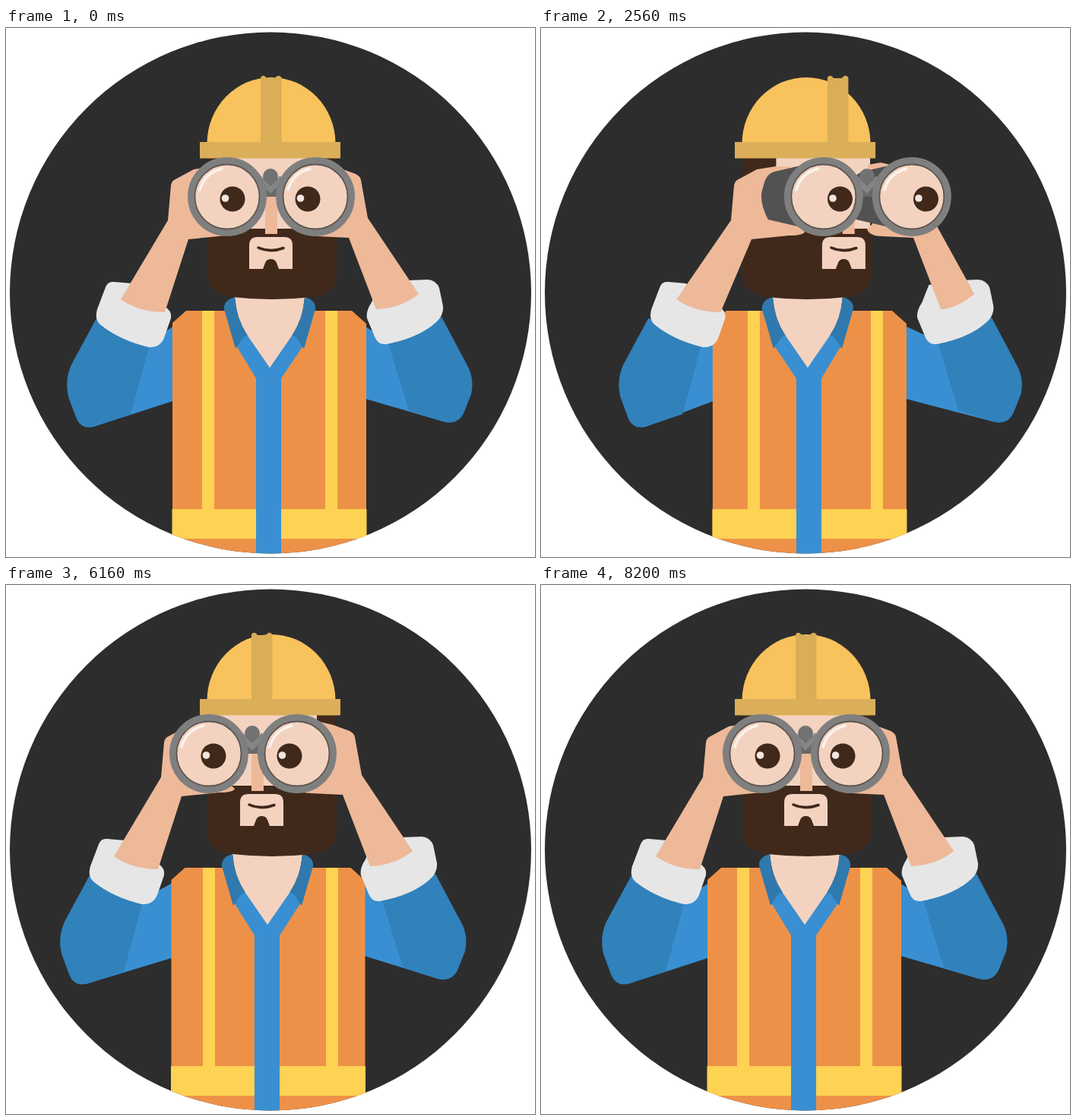
An HTML page that plays this animation: 696 px wide and 696 px high, repeating every 9.4 s.

```html
<!DOCTYPE html>
<html lang="en">
<head>
<meta charset="utf-8">
<title>Lookout</title>
<style>
html, body { margin: 0; width: 100%; height: 100%; overflow: hidden; background: #fff; }
svg { display: block; width: 100vw; height: 100vh; }
.skin { fill: #f3d3c0; }
.hand { fill: #edb999; }
.hair { fill: #40291b; }
.shirt { fill: #398fd1; }
.sleeve { fill: #3181bb; }
.collar { fill: #3079ae; }
.vest { fill: #ee9148; }
.tape { fill: #fed252; }
.cuff { fill: #e6e6e6; }
.barrel { fill: #525252; }
</style>
</head>
<body>
<svg viewBox="0 0 696 696">
  <defs>
    <clipPath id="disc"><circle cx="348" cy="348.5" r="343"/></clipPath>
    <clipPath id="skull"><rect x="267" y="160" width="166" height="110"/></clipPath>
    <g id="lens">
      <circle r="47.5" fill="#f3d3c0" stroke="#7f7f7f" stroke-width="9"/>
      <circle r="42.500" fill="none" stroke="#5c5450" stroke-width="1.8"/>
      <path d="M-36 -9Q-30 -31 -7 -37" fill="none" stroke="#fff" stroke-opacity=".7" stroke-width="3.5" stroke-linecap="round"/>
    </g>
    <g id="pupil">
      <circle r="16.5" class="hair"/>
      <circle cx="-9.5" cy="-1" r="4.8" fill="#f1e6e0"/>
    </g>
    <path id="lapel" class="collar" d="M301 354Q286 358 287 370L302 422L313 406L318 405Q303 382 301 354Z"/>
  </defs>
  <g clip-path="url(#disc)">
    <rect width="696" height="696" fill="#2d2d2d"/>
    <path id="upperL" class="shirt"/>
    <path id="upperR" class="shirt"/>
    <g id="vest">
      <path class="vest" d="M219 700V388L237 372H455L474 389V700Z"/>
      <rect class="tape" x="218.500" y="633" width="256" height="39"/>
    </g>
    <g id="tapes" class="tape">
      <rect x="258" y="372" width="16" height="262"/>
      <rect x="420" y="372" width="16" height="262"/>
    </g>
    <path id="shirt" class="shirt"/>
    <g id="neck">
      <path class="skin" d="M301 345V354Q303 382 318 405L347 447L376 405Q391 382 393 354V345Z"/>
      <use href="#lapel"/>
      <use href="#lapel" transform="translate(694)scale(-1 1)"/>
    </g>
    <rect class="hair" x="267" y="160" width="166" height="120"/>
    <g clip-path="url(#skull)"><rect id="face" class="skin" x="280" y="160" width="136" height="110"/></g>
    <path class="hair" d="M265 264H435V328Q433 349 402 354Q350 360 298 354Q267 349 265 328Z"/>
    <rect id="nose" class="hand" x="341" y="200" width="16" height="71"/>
    <g id="mouth">
      <path class="skin" d="M320 317V286Q320 275 331 275H366Q377 275 377 286V317H359L356 309Q354 304 348.500 304Q343 304 341 309L338 317Z"/>
      <path d="M332 289Q348 296 365 289.500" fill="none" stroke="#40291b" stroke-width="3.5" stroke-linecap="round"/>
    </g>
    <path d="M264.500 152A84.500 87 0 0 1 433.500 152Z" fill="#f8c25c"/>
    <path id="ridge" fill="#d9ae57" d="M335 152V65Q339 60 343 66H354Q358 60 362.500 65V152Z"/>
    <rect x="255" y="150" width="185" height="21.500" fill="#dbae5a"/>
    <path id="armL" class="sleeve" d="M119 382L86 443Q77 463 82 485L92 512Q98 528 114 525L164 508L192 405Z"/>
    <path id="armR" class="sleeve" d="M573 380L609 448Q616 464 612 482L602 507Q594 523 576 518L530 503L500 405Z"/>
    <path id="cuffL" class="cuff" d="M142 334Q134 333 131 341L120 370Q116 384 125 391Q150 411 188 420Q204 421 209 405L217 382Q219 372 208 366L165 336Z"/>
    <path id="cuffR" class="cuff" d="M530 332L555 331Q566 332 570 342L575 366Q576 378 566 387Q543 408 500 416Q489 417 485 406L475 382Q473 373 481 361L490 338Z"/>
    <path id="handL" class="hand"/>
    <path id="handR" class="hand"/>
    <path id="barrelL" class="barrel"/>
    <path id="barrelR" class="barrel"/>
    <g id="bridge">
      <path d="M-15 222L-9 203H9L15 222Z" fill="#696969"/>
      <path d="M-15 197L0 213L15 197" fill="none" stroke="#858585" stroke-width="7"/>
      <circle cy="195" r="10" fill="#727272"/>
    </g>
    <use id="lensL" href="#lens"/>
    <use id="lensR" href="#lens"/>
    <use id="pupilL" href="#pupil"/>
    <use id="pupilR" href="#pupil"/>
  </g>
</svg>
<script>
const LOOP = 9400, CYCLE = 5000;
const FAR_LEFT = -58, FAR_RIGHT = 83;
const el = {};
document.querySelectorAll('svg [id]').forEach(n => el[n.id] = n);

// Part offsets for each turn of the binoculars listed in TURNS.
const TURNS = [FAR_LEFT, -24, 0, 40, FAR_RIGHT];
const POSE = {
  vest: [-3, -1.5, 0, 4.5, 7],
  tapes: [2, 1, 0, 12, 14],
  placket: [-4, -2, 0, 5, 7],
  neck: [-6, -3, 0, 1, 4],
  face: [-16, -7, 0, 17, 30],
  nose: [-37, -18, 0, 30, 57],
  mouth: [-27.5, -12, 0, 28, 51],
  ridge: [-36.5, -12, 0, 21, 43],
  armL: [-26, -9, 0, 8, 23],
  armR: [-24, -8, 0, 7, 20],
  cuffL: [-26, -9, 0, 12, 26],
  cuffR: [-23, -8, 0, 8, 21],
  handL: [-27, -9, 0, 18, 38],
  handR: [-21, -8, 0, 20, 40],
  wristL: [-26, -9, 0, 14, 28],
  wristR: [-24, -8, 0, 13, 28],
  pupilL: [-16, 6, 7, 15, 22],
  pupilR: [-24, -10, -10, 11, 19],
  barrel: [64, 30, 0, -84, -83]
};

const smooth = u => u * u * (3 - 2 * u);
const mix = (a, b, u) => a + (b - a) * u;

function turnAt(t) {
  if (t < 440) return 0;
  if (t < 1560) return FAR_LEFT * smooth(((t - 440) / 1120) ** 1.85);
  if (t < 1920) return FAR_LEFT;
  if (t < 2612) return mix(FAR_LEFT, FAR_RIGHT, smooth((t - 1920) / 692));
  if (t < 3200) return mix(FAR_RIGHT, 0, smooth((t - 2612) / 588));
  return 0;
}

function poseAt(turn) {
  let i = 0;
  while (i < TURNS.length - 2 && turn > TURNS[i + 1]) i++;
  const u = (turn - TURNS[i]) / (TURNS[i + 1] - TURNS[i]);
  const pose = {};
  for (const key in POSE) pose[key] = mix(POSE[key][i], POSE[key][i + 1], u);
  return pose;
}

const move = (id, x, y = 0) => el[id].setAttribute('transform', `translate(${x} ${y})`);
const draw = (id, d) => el[id].setAttribute('d', d);

function drawBarrel(id, x, e) {
  draw(id, `M${x} 174L${x + e * .78} 189Q${x + e * .92} 192 ${x + e * .96} 210
    Q${x + e * 1.04} 226 ${x + e * .88} 252L${x} 269Z`);
}

function render(time) {
  const turn = turnAt(time % LOOP % CYCLE);
  const p = poseAt(turn);
  const left = 291 + turn, right = 407 + turn;

  for (const id of ['vest', 'tapes', 'neck', 'face', 'nose', 'mouth', 'ridge', 'armL', 'armR', 'cuffL', 'cuffR']) {
    move(id, p[id]);
  }

  draw('upperL', `M${114 + p.armL} 525L${222 + p.vest} 490V391L${190 + p.armL} 413Z`);
  draw('upperR', `M${576 + p.armR} 518L${470 + p.vest} 487V391L${505 + p.armR} 413Z`);

  const n = p.neck, b = p.placket;
  draw('shirt', `M${306 + n} 400H${388 + n}L${391 + n} 418L${362 + b} 461V700H${329 + b}V461L${303 + n} 418Z`);

  const hl = p.handL, wl = p.wristL, hr = p.handR, wr = p.wristR;
  draw('handL', `M${213 + hl} 253L${217 + hl} 207Q${218 + hl} 201 ${223 + hl} 199L${247 + hl} 186
    L${272 + hl} 182H${290 + hl}V250L${310 + hl} 268Q${308 + hl} 273 ${290 + hl} 273L${240 + hl} 278
    L${209 + wl} 374Q${175 + wl} 374 ${151 + wl} 357Z`);
  draw('handR', `M${476 + hr} 250L${467 + hr} 200Q${466 + hr} 195 ${460 + hr} 192L${438 + hr} 184
    L${408 + hr} 177L${391 + hr} 180Q${389 + hr} 188 ${404 + hr} 192V250L${390 + hr} 265
    Q${394 + hr} 274 ${410 + hr} 274L${451 + hr} 276
    L${487 + hr} 370Q${520 + wr} 369 ${543 + wr} 350Z`);

  drawBarrel('barrelL', left, p.barrel);
  drawBarrel('barrelR', right, p.barrel);
  move('bridge', (left + right) / 2 - 1);
  move('lensL', left, 222);
  move('lensR', right, 222);
  move('pupilL', left + p.pupilL, 225);
  move('pupilR', right + p.pupilR, 225);
}

function tick() {
  render(performance.now());
  requestAnimationFrame(tick);
}
tick();
</script>
</body>
</html>
```
